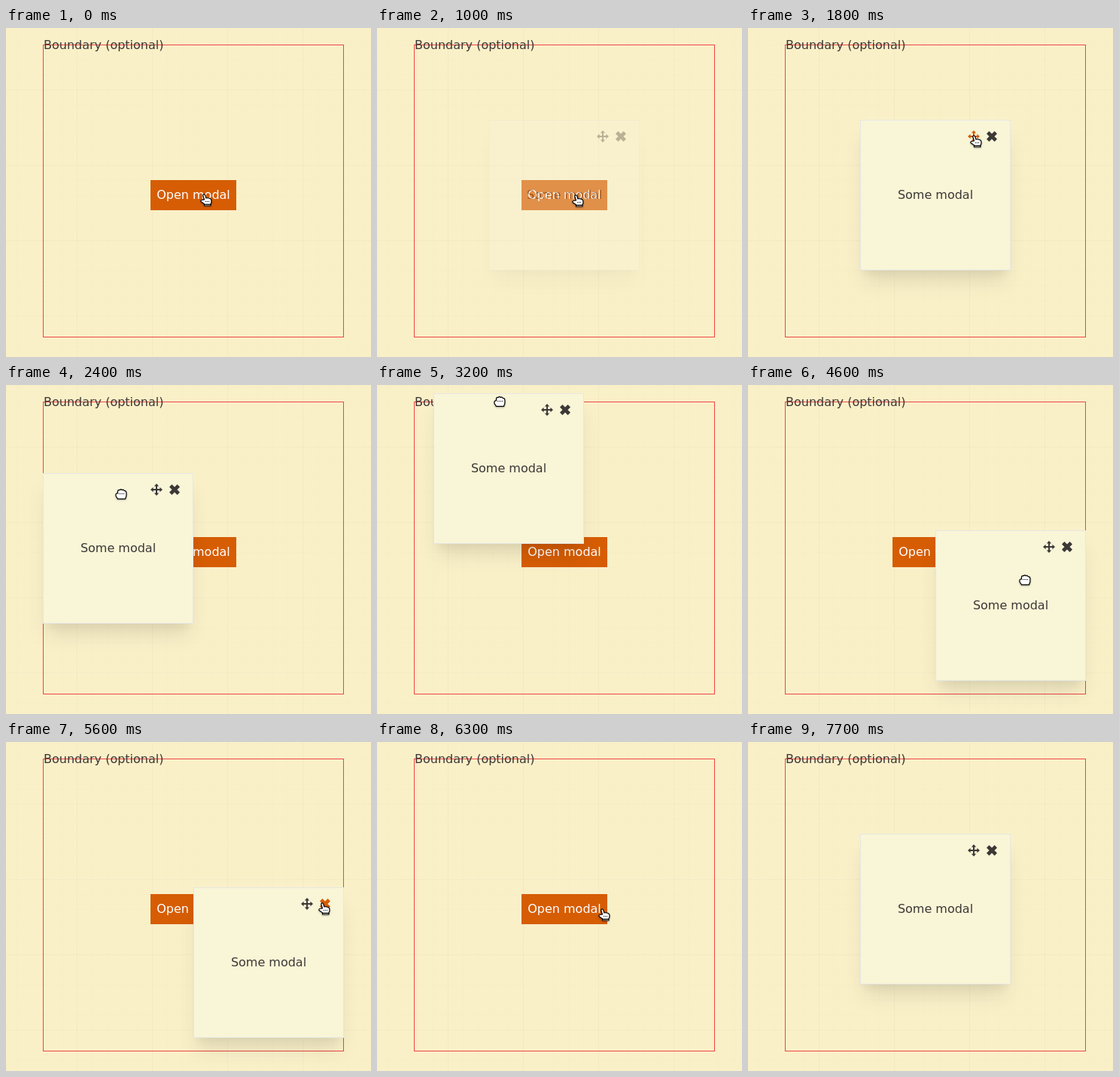
An HTML page that plays this animation: 485 px wide and 437 px high, repeating every 8100 ms.

```html
<!DOCTYPE html>
<html lang="en">
<head>
<meta charset="utf-8">
<title>Draggable modal</title>
<style>
  :root { --bg: #faf0c8; --ink: #3c3836; --accent: #d65d04; --line: rgba(60, 56, 54, .022); --fine: rgba(60, 56, 54, .012); }
  html, body { margin: 0; width: 100%; height: 100%; overflow: hidden; }
  body {
    position: relative;
    font: 16px/24px "DejaVu Sans", sans-serif;
    color: var(--ink);
    background:
      linear-gradient(var(--line) 1px, transparent 1px) 0 82px / 100px 100px,
      linear-gradient(90deg, var(--line) 1px, transparent 1px) 94px 0 / 100px 100px,
      linear-gradient(var(--fine) 1px, transparent 1px) 0 2px / 20px 20px,
      linear-gradient(90deg, var(--fine) 1px, transparent 1px) 14px 0 / 20px 20px,
      var(--bg);
  }
  .boundary, .label, .button, #modal, #cursor { position: absolute; box-sizing: border-box; }
  .boundary { left: 49px; top: 22px; width: 400px; height: 389px; border: 1px solid #ef4444; }
  .label { left: 50px; top: 11px; white-space: nowrap; }
  .label::before { content: ""; position: absolute; z-index: -1; left: 0; right: 0; top: 11px; height: 1px; background: var(--bg); }
  .button { left: 192px; top: 202px; width: 114px; height: 40px; line-height: 40px; text-align: center; white-space: nowrap; color: #fff; background: var(--accent); }
  #modal {
    left: 0; top: 0; width: 200px; height: 200px; line-height: 198px; text-align: center;
    background: #f9f5d7; border: 1px solid #e5e7e3;
    box-shadow: 0 20px 25px -5px rgba(0, 0, 0, .1), 0 10px 10px -5px rgba(0, 0, 0, .04);
  }
  #modal svg { position: absolute; top: 13px; width: 16px; height: 16px; color: var(--ink); }
  #modal svg.hot { color: var(--accent); }
  #move { left: 142px; }
  #close { left: 166px; }
  #cursor { left: -8px; top: -8px; width: 20px; height: 20px; overflow: visible; filter: drop-shadow(0 1px 1px rgba(0, 0, 0, .3)); }
  #cursor g { display: none; fill: #fff; stroke: #000; stroke-width: 1.2; stroke-linejoin: round; }
  #cursor g.on { display: block; }
  #cursor .knuckles { fill: none; stroke-width: 1; stroke-dasharray: 1 1; }
</style>
</head>
<body>
<div class="boundary"></div>
<div class="label">Boundary (optional)</div>
<div class="button">Open modal</div>
<div id="modal">Some modal
  <svg id="move" viewBox="0 0 16 16"><path fill="currentColor" d="M8 0l3.2 3.6H9V7h3.4V4.8L16 8l-3.6 3.2V9H9v3.4h2.2L8 16l-3.2-3.6H7V9H3.6v2.2L0 8l3.6-3.2V7H7V3.6H4.8z"/></svg>
  <svg id="close" viewBox="0 0 16 16"><path stroke="currentColor" stroke-width="4.8" d="M2.7 2.7l10.6 10.6M13.3 2.7L2.7 13.3"/></svg>
</div>
<svg id="cursor" viewBox="0 0 20 20">
  <g id="hand">
    <path d="M5.5 8L3.8 2.6Q3.9.6 5.6 1 6.5 1.3 6.900 2.600L7.900 6Q9 5 10.200 6 11.400 5.400 12.300 6.300 14.400 6.200 14.900 8.600V12L14 13.600V16H5.500V13.800L1.200 10.800Q.2 9 2 8.500z"/>
    <path class="knuckles" d="M7 10.5h6"/>
    <path d="M5.500 14.300H14"/>
  </g>
  <g id="fist">
    <path d="M3.5 7V4.2Q4 1.8 6.2 2.7 7.5.8 9.2 2.5 11 1.5 12 3.3 14.6 3.2 14.9 5.8V10.5L13.5 14.3H3.5L1 10.5V8.2Q1.4 6.6 3.5 7z"/>
    <path class="knuckles" d="M5 7.5h8"/>
  </g>
  <g id="arrow"><path d="M5 .5v14l3.3-3 2.3 5.3 2.3-1-2.3-5.1h4.8z"/></g>
</svg>
<script>
  const LOOP = 8100, TICK = 100, FADE = 300;
  const GRAB = 1800, DROP = 4800, REOPEN = 6700, LEAVE = 7700;
  const HOME = { x: 149, y: 122 };
  const $ = id => document.getElementById(id);
  const clamp = (v, lo, hi) => Math.min(hi, Math.max(lo, v));
  const ramp = (t, from, to) => clamp((t - from) / (to - from), 0, 1);
  const ease = p => p * p * (3 - 2 * p);

  // Mouse moves: start, end, x, y.
  const moves = [
    [100, 200, 267, 229], [1200, GRAB, 303, 150],
    [GRAB, 2400, 153, 145], [2400, 2600, 137, 145], [2600, 3200, 163, 22],
    [3400, 4000, 171, 277], [4100, 4600, 368, 259], [4600, DROP, 370, 259],
    [5000, 5700, 426, 219], [5900, 6300, 302, 229], [6300, 6500, 291, 224],
    [7300, 7600, 106, 29]
  ];

  function pointer(t) {
    let x = 266, y = 228;
    for (const [from, to, endX, endY] of moves) {
      const p = ease(ramp(t, from, to));
      x += (endX - x) * p;
      y += (endY - y) * p;
    }
    return { x, y };
  }

  // The modal follows the mouse but cannot leave the boundary.
  function modalAt(t) {
    let { x, y } = HOME;
    if (t >= REOPEN) return { x, y };
    let last = pointer(GRAB);
    for (let s = GRAB + TICK; s <= Math.min(t, DROP); s += TICK) {
      const now = pointer(s);
      x = clamp(x + now.x - last.x, 49, 249);
      y = clamp(y + now.y - last.y, 11, 211);
      last = now;
    }
    return { x, y };
  }

  const opacity = t => {
    const step = from => ramp(t, from, from + FADE);
    return step(900) - step(5800) + step(REOPEN);
  };

  const place = (el, { x, y }) => {
    el.style.transform = `translate(${Math.round(x)}px, ${Math.round(y)}px)`;
  };

  function draw(elapsed) {
    const t = Math.floor((elapsed % LOOP) / TICK) * TICK;
    const mouse = pointer(t), box = modalAt(t), alpha = opacity(t);
    const tip = { x: mouse.x - 3, y: mouse.y - 8 };
    const over = (x, y, w, h) => tip.x >= x && tip.x <= x + w && tip.y >= y && tip.y <= y + h;
    const open = alpha > .5;
    const onMove = open && over(box.x + 142, box.y + 13, 17, 17);
    const onClose = open && over(box.x + 166, box.y + 13, 17, 17);
    const onButton = !open && over(192, 202, 114, 40);

    let shape = onMove || onClose || onButton ? "hand" : "arrow";
    if (t > GRAB && t < DROP) shape = "fist";
    if (t >= LEAVE) shape = "";

    place($("cursor"), mouse);
    place($("modal"), box);
    $("modal").style.opacity = alpha;
    $("move").classList.toggle("hot", onMove);
    $("close").classList.toggle("hot", onClose);
    for (const id of ["hand", "fist", "arrow"]) $(id).classList.toggle("on", id === shape);
  }

  const start = performance.now();
  function frame() {
    draw(performance.now() - start);
    requestAnimationFrame(frame);
  }
  frame();
</script>
</body>
</html>
```
